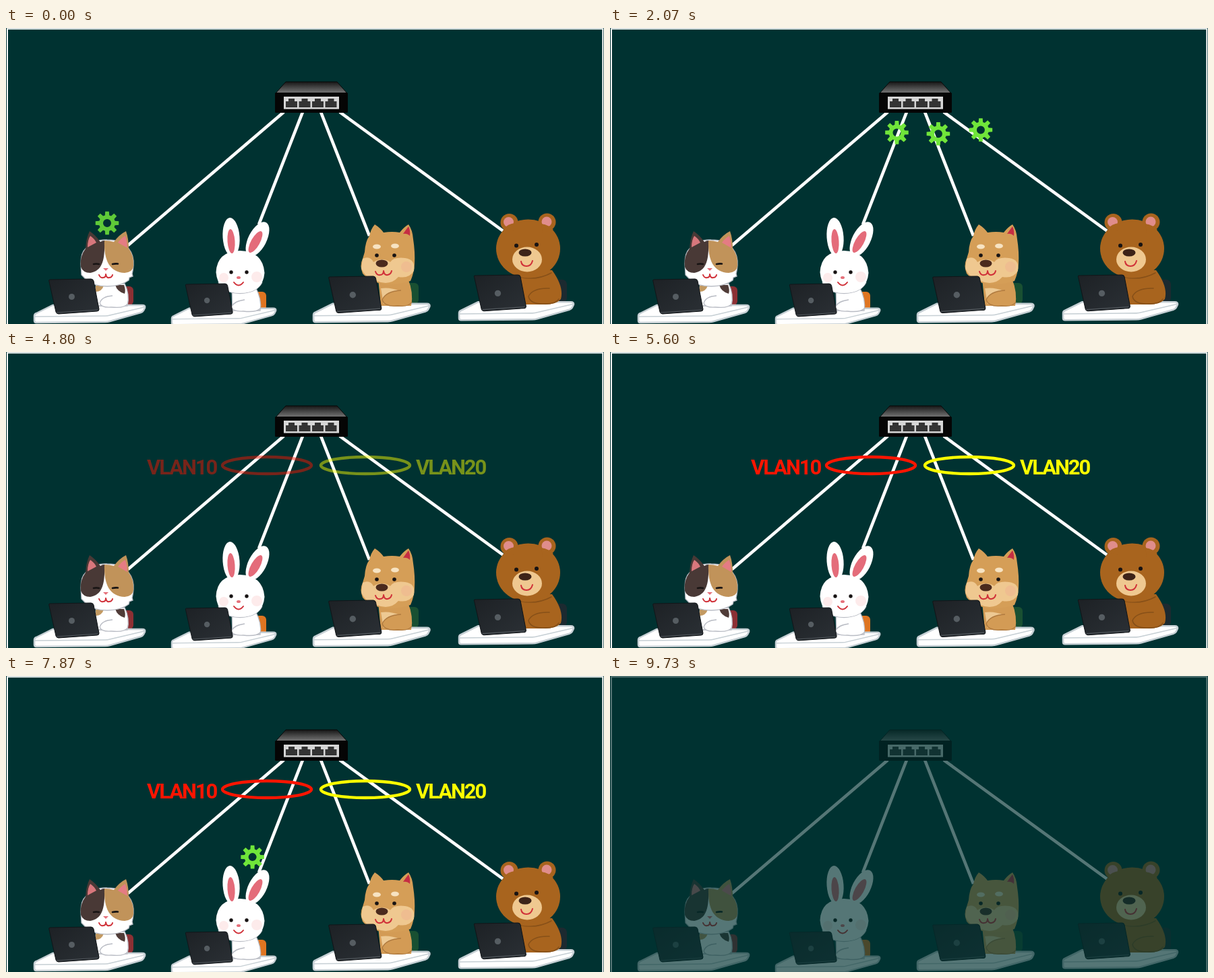
These frames come from a looping animation (887 by 440 pixels, 9.79 s). An HTML page:

```html
<!DOCTYPE html>
<html lang="en">
<head>
<meta charset="utf-8">
<title>Switch and VLANs</title>
<style>
html, body { margin: 0; width: 100%; height: 100%; overflow: hidden; background: #003231; }
svg { display: block; width: 887px; height: 440px; }
text { font: 700 31px Roboto, "Open Sans", sans-serif; letter-spacing: -2.1px; }
.line { fill: none; stroke-linecap: round; stroke-linejoin: round; }
.mouth { stroke: #d03038; stroke-width: 2; }
.fur { stroke: #b9bcc4; stroke-width: 1.3; }
</style>
</head>
<body>
<svg viewBox="0 0 887 440">
  <defs>
    <linearGradient id="lid" x2="0" y2="1">
      <stop stop-color="#161616"/><stop offset="1" stop-color="#777"/>
    </linearGradient>
    <linearGradient id="shell" x2="1" y2="1">
      <stop stop-color="#1d2125"/><stop offset="1" stop-color="#2b3035"/>
    </linearGradient>
    <g id="desk" stroke="#c6cfd4" stroke-linejoin="round">
      <path d="M28 38H161Q166 38 165 42L163 46Q162 48 159 49L113 62Q110 63 106 63L4 64Q1 64 1 61V54Q1 51 4 50Z" fill="#fff" stroke-width="2.500"/>
      <path d="M2 55L106 54Q110 54 113 53L164 41" fill="none" stroke-width="1.500"/>
    </g>
    <g id="laptop">
      <path d="M24 0L85 -1Q88 -1 89 2L97 44Q97 47 94 47L37 51Q34 51 33 48L23 3Q22 0 24 0Z" fill="url(#shell)" stroke="#111518"/>
      <path d="M34 49L95 45" stroke="#50565b" stroke-width="1.200"/>
      <circle cx="56.500" cy="25.500" r="4.500" fill="#565d62"/>
    </g>
    <path id="port" d="M0 9V0H4V-4H13V0H17V9Z" fill="#343434"/>
    <path id="gear" fill="#70e53a" fill-rule="evenodd"/>
  </defs>

  <g id="scene">
    <path d="M2 440V1.300H885.300V440" fill="none" stroke="#fff" stroke-width="2"/>
    <path d="M412 125L181 323M440 125L375 292M467 125L539 309M495 125L737 301.500" stroke="#fff" stroke-width="4.600"/>

    <g id="switch">
      <path d="M415 80H491L506 97H400Z" fill="url(#lid)" stroke="#080808"/>
      <rect x="399" y="96" width="108" height="30" rx="1.500" fill="#050505"/>
      <rect x="412" y="102" width="82" height="18.500" fill="#d6d6d6"/>
      <use href="#port" x="415" y="109"/><use href="#port" x="434.500" y="109"/>
      <use href="#port" x="454" y="109"/><use href="#port" x="473.500" y="109"/>
    </g>

    <g id="cat">
      <rect x="171" y="384" width="18" height="28" rx="6" fill="#8c3034"/>
      <use href="#desk" transform="translate(41 374)"/>
      <path d="M134 380H176Q184 396 180 413H136Q130 396 134 380Z" fill="#fff" class="fur"/>
      <path d="M133 383H145Q142 392 133 392Z" fill="#c39a62"/>
      <path d="M162 382H175Q178 390 176 395Q165 392 162 382Z" fill="#503c38"/>
      <path d="M158 398Q142 399 139 409Q141 416 156 415Q176 417 180 410" fill="#fff" class="fur"/>
      <path d="M111 350Q111 334 118 328Q130 314 150 315Q172 315 182 328Q190 338 189 353Q188 363 187 365L188 369L183 371L182 375Q170 384 150 384Q130 384 119 375L116 371L112 367Z" fill="#fff" class="fur"/>
      <path d="M146 316Q142 316 140 318Q133 308 124 302Q119 312 118 328Q109 340 111 355Q114 364 125 364C143 361 147 345 146 316Z" fill="#493936"/>
      <path d="M146 316Q154 316 160 318Q168 307 178 302Q182 313 182 328Q190 338 189 354Q188 363 176 364C154 363 145 346 146 316Z" fill="#c1935a"/>
      <path d="M121 326Q121 315 125 309Q131 313 134 319Z" fill="#d8777c"/>
      <path d="M166 319Q171 312 177 309Q180 318 180 327Z" fill="#e47c83"/>
      <path d="M130 351Q134 350 138 351M158 351Q162 350 166 350.500" class="line" stroke="#171313" stroke-width="2.600"/>
      <path d="M144 357H152L148 361Z" fill="#e5707a"/>
      <path d="M138 367Q140 372 144 371Q148 371 148 366Q149 372 153 371Q157 371 158 367" class="line mouth"/>
      <use href="#laptop" transform="translate(41 374)"/>
    </g>

    <g id="rabbit">
      <rect x="366" y="392" width="20" height="28" rx="6" fill="#df7521"/>
      <use href="#desk" transform="translate(245 381) scale(.94)"/>
      <path d="M335 385H370Q380 404 377 420H336Z" fill="#fff" class="fur"/>
      <path d="M354 404Q338 406 334 415Q337 422 352 421Q372 423 377 417" fill="#fff" class="fur"/>
      <path d="M315 378Q322 394 347 394.500Q372 394 380 378" fill="#fff" class="fur"/>
      <g fill="#fff">
        <ellipse cx="334" cy="311" rx="12.500" ry="29" transform="rotate(-4 334 311)"/>
        <ellipse cx="373" cy="314" rx="13.500" ry="28" transform="rotate(27 373 314)"/>
        <path d="M311.500 363Q313 332 347 331Q381 332 383.500 364Q381 394 347 394Q314 394 311.500 363Z"/>
      </g>
      <ellipse cx="334" cy="317" rx="5.500" ry="18" fill="#e46c7a" transform="rotate(-4 334 317)"/>
      <ellipse cx="370" cy="318" rx="6.500" ry="18" fill="#e46c7a" transform="rotate(29 370 318)"/>
      <g fill="#fdebeb"><circle cx="323" cy="371" r="7"/><circle cx="372" cy="370" r="8"/></g>
      <g fill="#171313"><circle cx="334" cy="363" r="2.700"/><circle cx="357" cy="363" r="2.700"/></g>
      <ellipse cx="345" cy="371" rx="3" ry="2" fill="#e5707a"/>
      <path d="M338 378Q345 387 352 378" class="line mouth"/>
      <use href="#laptop" transform="translate(245 381) scale(.94)"/>
    </g>

    <g id="dog">
      <rect x="590" y="379" width="22" height="31" rx="6" fill="#195032"/>
      <use href="#desk" transform="translate(455 370) scale(1.05)"/>
      <path d="M552 372H596Q605 394 601 413H556Z" fill="#d39b55"/>
      <path d="M556 387Q570 385 584 391Q578 404 560 410Z" fill="#edc993"/>
      <path d="M586 390Q564 391 558 404Q562 415 581 413Q598 415 602 407" fill="#d39b55" stroke="#b07b40" stroke-width="1.300"/>
      <path d="M532 333Q533 317 539 309Q541 299 547 292Q555 297 560 304Q573 302 584 304Q590 296 597 292Q603 300 604 314Q607 333 606 351Q605 365 600 376Q583 382 563 381Q540 378 529 365Q524 353 529 343Z" fill="#d59e57"/>
      <path d="M529 343Q540 338 545 348Q558 340 570 348Q575 340 592 342Q608 344 605 361Q598 373 582 370Q570 384 549 376Q532 371 527 357Z" fill="#efc890"/>
      <circle cx="594" cy="355" r="8" fill="#efbd90"/>
      <path d="M589 306Q593 300 597 295Q600 301 599 309Q595 305 589 306Z" fill="#c52d43"/>
      <g fill="#f7e3c2"><ellipse cx="550" cy="325" rx="6" ry="3.500"/><ellipse cx="577" cy="324" rx="6" ry="3.500"/></g>
      <g fill="#171313"><circle cx="550" cy="338" r="2.800"/><circle cx="576" cy="338" r="2.800"/></g>
      <ellipse cx="557.500" cy="350" rx="9" ry="5.500" fill="#4b2a1d"/>
      <path d="M548 362Q550 368 555 367Q560 367 560 361Q561 368 566 367Q571 366 572 361" class="line mouth"/>
      <use href="#laptop" transform="translate(455 370) scale(1.05)"/>
    </g>

    <g id="bear">
      <rect x="810" y="374" width="22" height="34" rx="7" fill="#1c2a30"/>
      <use href="#desk" transform="translate(671 368) scale(1.035)"/>
      <path d="M757 360H810Q828 385 823 403Q815 412 795 411H765Z" fill="#a8641e"/>
      <path d="M758 369Q785 377 809 364M806 387Q781 386 775 399Q777 410 796 410Q815 411 820 403" class="line" stroke="#875018" stroke-width="1.600"/>
      <g fill="#a8641e">
        <circle cx="746.500" cy="289" r="13"/><circle cx="802.500" cy="288.500" r="13"/>
        <ellipse cx="774.500" cy="328" rx="47.500" ry="43.500"/>
      </g>
      <g fill="#e08d8b"><circle cx="745.500" cy="288.500" r="7.500"/><circle cx="802" cy="288" r="7.500"/></g>
      <path d="M738 299Q744 291 755 290V301ZM794 291Q806 293 812 300L796 304Z" fill="#a8641e"/>
      <ellipse cx="773" cy="344" rx="22" ry="18.500" fill="#efc890"/>
      <g fill="#171313"><circle cx="757" cy="323.500" r="3"/><circle cx="787" cy="322" r="3"/></g>
      <ellipse cx="770" cy="334" rx="9.500" ry="5.500" fill="#3d2318"/>
      <path d="M764 347Q765 354 772 354Q779 354 781 346" class="line mouth"/>
      <use href="#laptop" transform="translate(671 368) scale(1.035)"/>
    </g>

    <g id="vlans">
      <g fill="none" stroke-width="4.400">
        <ellipse cx="387" cy="168.500" rx="66" ry="12.500" stroke="#ff1500"/>
        <ellipse cx="533" cy="168.500" rx="66" ry="12.500" stroke="#ff0"/>
      </g>
      <text x="209" y="182" fill="#ff1500">VLAN10</text>
      <text x="608" y="182" fill="#ff0">VLAN20</text>
    </g>
    <g id="gears"><use href="#gear"/><use href="#gear"/><use href="#gear"/></g>
  </g>
</svg>
<script>
const LOOP = 9790;
const cat = [150, 290], hub = [453, 103];
const targets = [[362, 276], [565, 282], [773, 263]];
const $ = id => document.getElementById(id);
const gears = [...$('gears').children];

const ramp = (t, start, length) => Math.min(1, Math.max(0, (t - start) / length));
const ease = p => (1 - Math.cos(Math.PI * p)) / 2;
const mix = (a, b, p) => a.map((v, i) => v + (b[i] - v) * p);

// Eight tapered teeth around a round hole
function gearPath() {
  const points = [];
  for (let i = 0; i < 8; i++) {
    for (const [offset, r] of [[-.27, 12], [-.16, 17.5], [.16, 17.5], [.27, 12]]) {
      const a = i * Math.PI / 4 + offset;
      points.push((r * Math.sin(a)).toFixed(2) + ' ' + (-r * Math.cos(a)).toFixed(2));
    }
  }
  return 'M' + points.join('L') + 'ZM-6 0a6 6 0 1 0 12 0a6 6 0 1 0-12 0Z';
}

function draw(t) {
  const second = t > 5000;
  const [start, arrive, outTime] = second ? [6400, 7400, 540] : [700, 1700, 1000];
  const inward = ease(ramp(t, start, 1000));
  const outward = ease(ramp(t, arrive, outTime));
  const fadeOut = 1 - ramp(t, 8380, 960);

  gears.forEach((gear, i) => {
    const [x, y] = t < arrive ? mix(cat, hub, inward) : mix(hub, targets[i], outward);
    gear.setAttribute('transform', `translate(${x} ${y})`);
    const shown = i === 0 || (!second && t >= arrive);
    gear.setAttribute('visibility', shown ? 'visible' : 'hidden');
  });

  $('gears').setAttribute('opacity', second
    ? ramp(t, 5840, 530) * fadeOut
    : (.85 + .15 * ramp(t, 440, 130)) * (1 - ramp(t, 3235, 650)));
  $('vlans').setAttribute('opacity', ramp(t, 4370, 920) * fadeOut);
  $('scene').setAttribute('opacity', 1 - ramp(t, 9370, 540));
}

$('gear').setAttribute('d', gearPath());
const begin = performance.now();
function tick() {
  draw((performance.now() - begin) % LOOP);
  requestAnimationFrame(tick);
}
tick();
</script>
</body>
</html>
```
